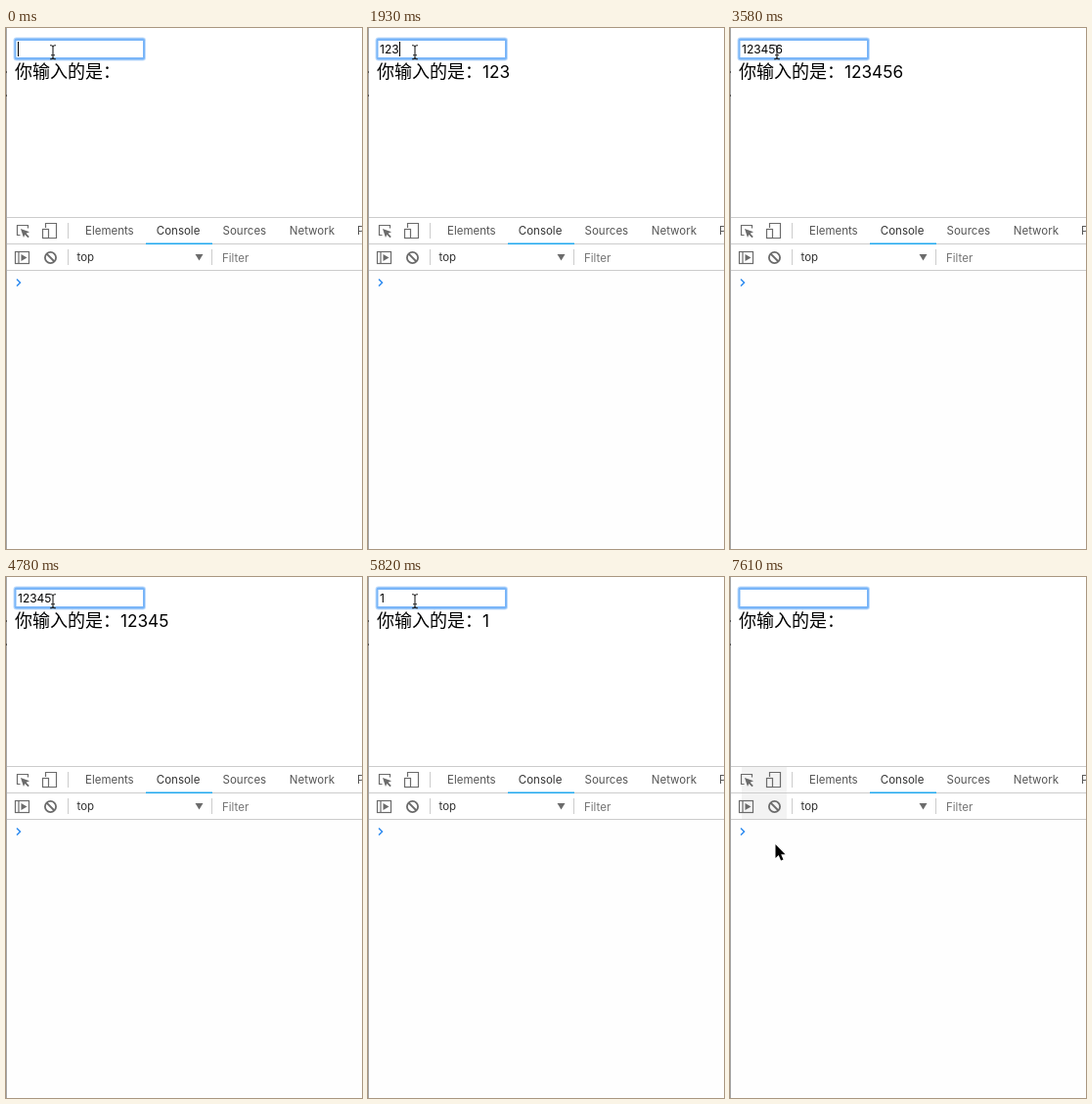
An HTML page that plays this animation: 364 px wide and 532 px high, repeating every 8 s.

```html
<!DOCTYPE html>
<html lang="zh-CN">
<head>
<meta charset="utf-8">
<title>Input binding</title>
<style>
  html, body { margin: 0; width: 100%; height: 100%; overflow: hidden; background: #fff; }
  svg { display: block; }
  .label { font: 18px "Noto Sans CJK SC", "Noto Sans CJK", sans-serif; }
  .echo { font: 17.2px Inter, sans-serif; }
  .typed { font: 12px Inter, sans-serif; }
  .tools { font: 11.5px Inter, sans-serif; fill: #555; }
  .tools .active { fill: #333; }
  .tools .hint { fill: #757575; }
  .icon { fill: none; stroke: #6b6b6b; stroke-width: 1.2; }
  .icon .bold { stroke-width: 1.8; }
  .icon .solid { fill: #6b6b6b; stroke: none; }
</style>
</head>
<body>
<svg width="364" height="532" viewBox="0 0 364 532">
  <rect width="364" height="532" fill="#fff"/>
  <rect y="248" width="364" height="284" fill="#fefefe"/>

  <!-- page -->
  <rect x="7.5" y="9.5" width="135.5" height="24" rx="3" fill="#c3defc"/>
  <rect x="8.5" y="10.5" width="133.5" height="22" rx="2" fill="#79b5f8"/>
  <rect x="10.5" y="13" width="129.5" height="17" fill="#fff"/>
  <text class="label" x="9" y="51">你输入的是：</text>
  <text class="echo" id="echo" x="117" y="51"></text>
  <text class="typed" id="typed" x="12" y="26"></text>
  <rect id="caret" y="14" width="1" height="15"/>

  <!-- developer tools -->
  <path id="shade" d="M12 194H58V247H12Z" fill="#f3f3f3"/>
  <path d="M1 193.5H364M1 220.5H364M1 247.5H364M63.5 199V215M63.5 226V242M210.5 226V242" stroke="#ccc"/>
  <rect x="143" y="219.5" width="68" height="1.5" fill="#1fa8ee"/>
  <path d="M.5 0V532" stroke="#a6a6a6"/>
  <path d="M.5 44V46M.5 68V70" stroke="#555"/>
  <g class="tools">
    <text x="81" y="211">Elements</text>
    <text x="153.8" y="211" class="active">Console</text>
    <text x="221.6" y="211">Sources</text>
    <text x="289.8" y="211">Network</text>
    <text x="359" y="211">Performance</text>
    <text x="72.5" y="238" class="active">top</text>
    <text x="221" y="239" class="hint">Filter</text>
  </g>
  <g class="icon">
    <path d="M14.5 211.5H11.5V201.5H22.5V204.5"/>
    <path class="solid" d="M15 205L24 208.3L20.6 209.7L23.8 213L22.5 214.3L19.3 211L18 214Z"/>
    <path d="M40.5 204V199.5H51.5V214.5H44"/>
    <rect x="37.5" y="205.5" width="6" height="9"/>
    <rect x="9.5" y="228.5" width="14" height="12"/>
    <path d="M13 228.5V240.5"/>
    <path class="solid" d="M15.5 231L21.5 234.5L15.5 238Z"/>
    <circle class="bold" cx="45.5" cy="234.5" r="5.6"/>
    <path class="bold" d="M41.5 230.5L49.5 238.5"/>
    <path class="solid" d="M193.5 231H201.5L197.5 237.5Z"/>
  </g>
  <path d="M11 256.5L14.5 260L11 263.5" fill="none" stroke="#2e8bf0" stroke-width="1.5"/>

  <!-- pointers -->
  <path id="beam" d="M-3 -7H-2Q0 -7 0 -5V5Q0 7 -2 7H-3M3 -7H2Q0 -7 0 -5M0 5Q0 7 2 7H3M-2 3H2"
        fill="none" stroke="#222" stroke-width="1.1"/>
  <path id="arrow" d="M0 0V14L3.2 11L5.6 16.5L8 15.5L5.7 10.2H10Z"
        stroke="#fff" stroke-width="1.4" paint-order="stroke"/>
</svg>
<script>
const LOOP = 8000, DIGITS = "123456";
const TICK = 149.2;
const TYPE_START = 7.7, TYPE_STEP = 2.72;     // key presses, in ticks
const ERASE_START = 31.8, ERASE_STEP = 1.75;
const MOVE_START = 47, MOVE_TICKS = 4;
const BLINK = 1000, BLINK_ON = 450;

const [echo, typed, caret, shade, beam, arrow] =
  ["echo", "typed", "caret", "shade", "beam", "arrow"].map(id => document.getElementById(id));

const clamp = (v, lo, hi) => Math.min(hi, Math.max(lo, v));
const mod = (a, n) => ((a % n) + n) % n;
const lerp = (a, b, p) => a + (b - a) * p;
const show = (node, on) => node.setAttribute("visibility", on ? "visible" : "hidden");
const keyPresses = (tick, start, step) =>
  clamp(Math.floor((tick + 0.5 - start) / step) + 1, 0, DIGITS.length);

// The caret blinks, but stays solid while digits are being typed.
function caretOn(tick, pressed) {
  if (pressed > 0 && pressed < DIGITS.length) return true;
  const origin = pressed ? 3100 : 590;
  return mod(tick * TICK - origin, BLINK) < BLINK_ON;
}

function placePointer(tick) {
  const p = clamp((tick - MOVE_START) / MOVE_TICKS, 0, 1);
  const eased = 1 - (1 - p) ** 2;
  const [x, y] = tick < MOVE_START ? [48, 24.7] : [lerp(51.5, 46.5, eased), lerp(62.5, 273, eased)];
  for (const node of [beam, arrow]) {
    node.setAttribute("transform", `translate(${x} ${y})`);
    show(node, node === (p > 0 ? arrow : beam));
  }
  show(shade, p === 1);
}

function draw(t) {
  const tick = Math.floor((t + 12) / TICK);
  const pressed = keyPresses(tick, TYPE_START, TYPE_STEP);
  const erased = keyPresses(tick, ERASE_START, ERASE_STEP);
  typed.textContent = echo.textContent = DIGITS.slice(0, pressed - erased);
  caret.setAttribute("x", Math.round(12 + typed.getComputedTextLength()));
  show(caret, caretOn(tick, pressed));
  placePointer(tick);
}

const start = performance.now();
function frame() {
  draw((performance.now() - start) % LOOP);
  requestAnimationFrame(frame);
}
frame();
</script>
</body>
</html>
```
